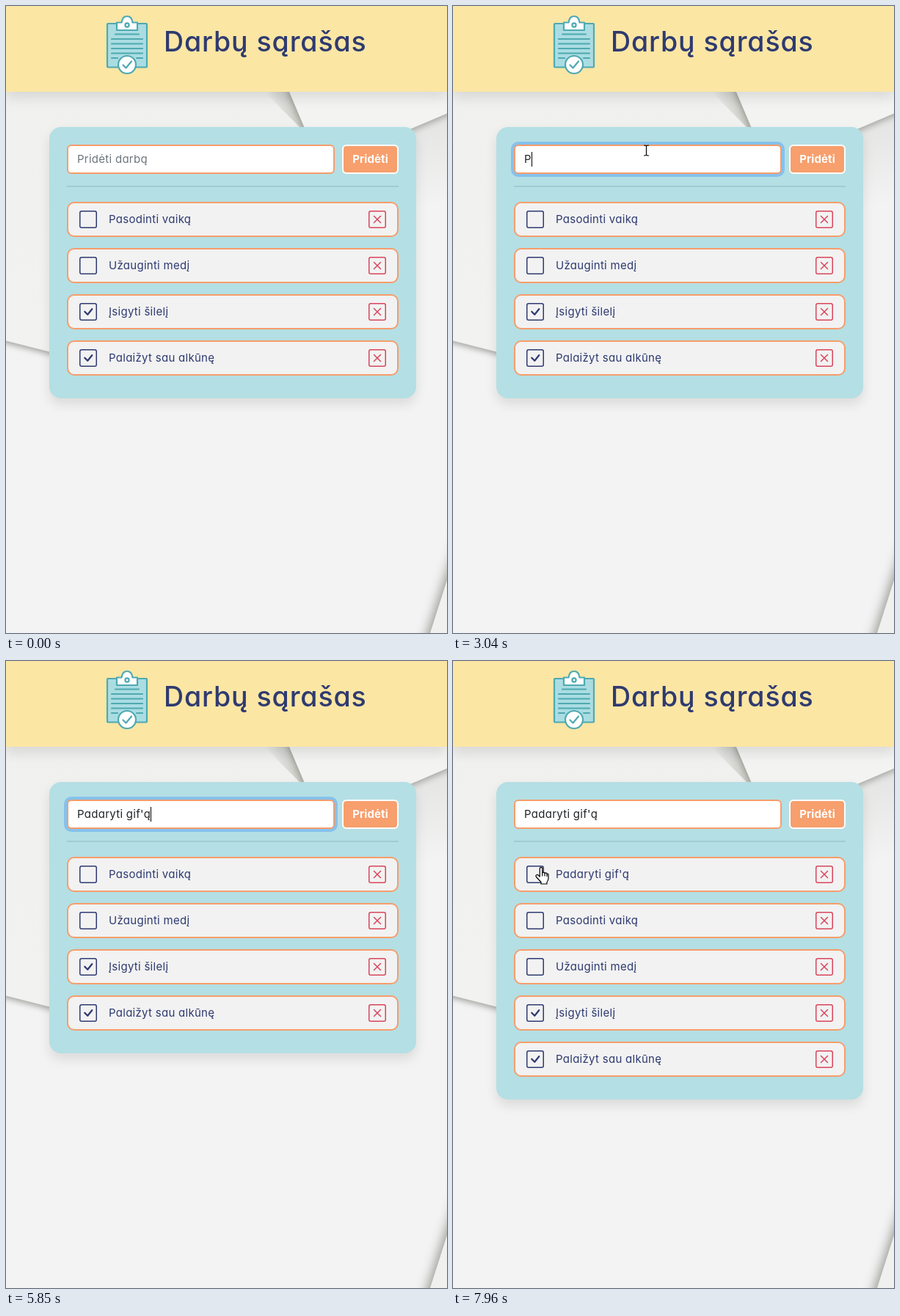
Animation, 601 px wide and 855 px high, one loop 8000 ms. Source, as an HTML page with a canvas:

```html
<!DOCTYPE html>
<html lang="lt">
<head>
<meta charset="utf-8">
<title>Darbų sąrašas</title>
<style>
  html, body { margin: 0; width: 100%; height: 100%; overflow: hidden; }
  body {
    position: relative;
    font: 400 15px/24px Inter, "Open Sans", sans-serif;
    font-feature-settings: "cv11";
    letter-spacing: .28px;
    background: #f3f3f3;
  }
  body * { box-sizing: border-box; }
  #paper, header, #card, #field, #add, hr, li, #pointer { position: absolute; margin: 0; }
  #paper { left: 0; top: 0; }
  header {
    left: 0; top: 0; width: 100%; height: 117px;
    background: #fbe6a4; box-shadow: 0 8px 16px rgba(0, 0, 0, .11);
  }
  header svg { position: absolute; left: 0; top: 0; }
  h1 {
    position: absolute; left: 215px; top: 25px; margin: 0;
    font-size: 37.5px; line-height: 48px; font-weight: 500;
    letter-spacing: .9px; color: #2e3a70; white-space: nowrap;
  }
  #card {
    left: 59px; top: 165px; width: 500px; border-radius: 16px;
    background: #b4dfe4; box-shadow: 0 8px 16px rgba(0, 0, 0, .1);
  }
  #field {
    left: 24px; top: 24px; width: 365px; height: 40px; padding: 0 12px;
    display: flex; align-items: center; white-space: pre;
    background: #fff; border: 2px solid #f79d6b; border-radius: 6px;
  }
  #caret { width: 1px; height: 20px; background: #000; }
  #add {
    left: 399px; top: 24px; width: 77px; height: 40px;
    font-weight: 700; line-height: 36px; letter-spacing: .1px;
    text-align: center; color: #fff;
    background: #f79f6d; border: 2px solid #fff; border-radius: 6px;
  }
  hr { left: 24px; top: 80px; width: 452px; height: 2px; border: 0; background: #a2cbd1; }
  ul { margin: 0; padding: 0; list-style: none; }
  li {
    left: 24px; width: 452px; height: 48px; padding: 0 15px;
    display: flex; align-items: center; color: #2e3a70;
    background: #f2f2f2; border: 2px solid #f79d6b; border-radius: 10px;
  }
  li span { flex: 1; margin-left: 16px; }
  li svg { width: 24px; height: 24px; }
  #pointer { left: 0; top: 0; }
  svg { fill: none; stroke-linecap: round; stroke-linejoin: round; }
</style>
</head>
<body>
<canvas id="paper" width="601" height="855"></canvas>

<header>
  <svg width="210" height="117" stroke="#4fa9b1" stroke-width="2.2">
    <rect x="138" y="24" width="54" height="59.5" rx="1" fill="#aadde2"/>
    <path d="M151 33V22.5h6.5q1-8.5 7.5-8.5t7.5 8.5h6.5V33z" fill="#fff"/>
    <circle cx="165" cy="26" r="2.6" fill="#fff"/>
    <path d="M149 38.5h32M144 45h42M144 51.5h42M144 58h42M144 64.5h42M144 71h8M178 71h8"/>
    <circle cx="165" cy="80" r="12" fill="#fff"/>
    <path d="M159.5 80.5l4 4 7.500-9"/>
  </svg>
  <h1>Darbų sąrašas</h1>
</header>

<main id="card">
  <div id="field"><span id="value"></span><i id="caret"></i></div>
  <div id="add">Pridėti</div>
  <hr>
  <ul id="list"></ul>
</main>

<svg id="pointer" width="601" height="855" stroke="#000">
  <path id="arrow" fill="#fff" d="M.5 .5V16.500l3.700-3.500 2.500 5.800 2.500-1.100-2.500-5.600h5z"/>
  <path id="beam" d="M-3-7q2.500 0 3 1 .5-1 3-1M0-6V6M-3 7q2.500 0 3-1 .5 1 3 1" stroke-width="1.2"/>
  <path id="hand" fill="#fff" stroke-width="1.2"
    d="M-1.700 13V2q0-1.700 1.700-1.700T1.700 2v6.500q.3-1.300 1.700-1.300T5 8.800q.2-1 1.500-1T8 9.500q2-1 2 1V15q0 3-2 5.500V23H0v-2.500L-6.500 13.500q-1.300-2 .3-2.800t3 1zM1.700 8.500V12M5 8.800V12M8 9.500V12.500"/>
</svg>

<script>
const LOOP = 8000, TICK = 70;
const CLICK = 1630, ADDED = 6050, BLUR = 6250;
const $ = id => document.getElementById(id);
const clamp = v => Math.max(0, Math.min(1, v));

function drawPaper() {
  const c = $('paper').getContext('2d');

  function poly(points, fill) {
    c.beginPath();
    points.forEach(([x, y]) => c.lineTo(x, y));
    c.closePath();
    c.fillStyle = fill;
    c.fill();
  }

  function fade(x0, y0, x1, y1, from, to) {
    const g = c.createLinearGradient(x0, y0, x1, y1);
    g.addColorStop(0, from);
    g.addColorStop(1, to);
    return g;
  }

  function sheet(points, fill, dx, dy, blur, alpha) {
    c.save();
    c.shadowColor = `rgba(90, 95, 85, ${alpha})`;
    c.shadowOffsetX = dx;
    c.shadowOffsetY = dy;
    c.shadowBlur = blur;
    poly(points, fill);
    c.restore();
  }

  c.fillStyle = '#f3f3f3';
  c.fillRect(0, 0, 601, 855);
  sheet([[-30, 90], [420, 90], [420, 200], [250, 520], [-30, 449]],
    fade(0, 117, 0, 456, '#f0f0ee', '#f2f2f1'), 0, 3, 8, .55);
  poly([[352, 117], [386, 117], [410, 175], [400, 165]],
    fade(362, 140, 394, 128, 'rgba(150, 152, 142, 0)', 'rgba(150, 152, 142, .5)'));
  poly([[540, 165], [601, 147], [601, 400], [540, 400]],
    fade(570, 160, 595, 270, 'rgba(60, 60, 50, .08)', 'rgba(60, 60, 50, 0)'));
  sheet([[386, 117], [386, 90], [640, 90], [640, 130], [553, 167], [430, 220]],
    '#f3f3f2', 0, 3, 10, .5);
  sheet([[640, 665], [601, 783], [578, 855], [570, 880], [640, 880]],
    '#f0f0ef', -3, 0, 16, .65);
}

function icon(color, mark, width) {
  return `<svg viewBox="0 0 16 16" stroke="${color}">
    <rect x=".5" y=".5" width="15" height="15" rx="1.5"/>
    <path d="${mark}" stroke-width="${width}"/></svg>`;
}

const tasks = [
  ["Padaryti gif'ą"], ['Pasodinti vaiką'], ['Užauginti medį'],
  ['Įsigyti šilelį', true], ['Palaižyt sau alkūnę', true]
];
const rows = tasks.map(([text, done]) => {
  const row = document.createElement('li');
  row.innerHTML = icon('#2e3a70', done ? 'M4.850 7.850l2.650 2.650 4-5' : '', 1.5) +
    `<span>${text}</span>` + icon('#d9455a', 'M5 5l6 6M11 5l-6 6', 1);
  $('list').append(row);
  return row;
});

// Evenly typed runs of letters
const bursts = [
  { start: 2970, gap: 200, count: 5 },
  { start: 4100, gap: 113, count: 4 },
  { start: 5030, gap: 155, count: 5 }
];
const keys = bursts.flatMap(b =>
  Array.from({ length: b.count }, (_, i) => b.start + i * b.gap));

// Curved moves; the pointer rests on `to` until `gone`
const moves = [
  { start: 110, stop: 590, gone: 790, from: [500, 735], bend: [335, 465], to: [257, 313] },
  { start: 790, stop: 1560, gone: 3630, from: [256, 308], bend: [206, 207], to: [263.5, 197] },
  { start: 7060, stop: 7890, gone: LOOP, from: [262, 198], bend: [205, 222], to: [120, 281] }
];

function place({ start, stop, from, bend, to }, t) {
  const p = clamp(Math.floor((t - start) / TICK + 1e-6) * TICK / (stop - start));
  const q = 1 - p;
  return from.map((v, i) => q * q * v + 2 * p * q * bend[i] + p * p * to[i]);
}

function drawPointer(t) {
  const move = moves.find(m => t >= m.start && t < m.gone);
  let kind = '';
  if (move) {
    const [x, y] = place(move, t);
    kind = y < 229 ? 'beam' : x < 125 ? 'hand' : 'arrow';
    $(kind).setAttribute('transform', `translate(${x} ${y})`);
  }
  for (const id of ['arrow', 'beam', 'hand']) {
    $(id).style.display = id === kind ? '' : 'none';
  }
}

function drawField(t) {
  const past = keys.filter(k => t >= k);
  const typed = tasks[0][0].slice(0, past.length);
  $('value').textContent = typed || 'Pridėti darbą';
  $('value').style.color = typed ? '#212529' : '#6c757d';

  const idle = t - (past.pop() || CLICK);
  const lit = t >= CLICK && t < ADDED && idle % 1010 < 480;
  const caret = $('caret').style;
  caret.visibility = lit ? 'visible' : 'hidden';
  caret.order = typed ? 0 : -1;
  caret.marginRight = typed ? '0' : '-1px';

  const focus = t < BLUR ? clamp((t - CLICK + 50) / 180) : 0;
  $('field').style.boxShadow = `0 0 0 ${4 * focus}px rgba(13, 110, 253, ${.27 * focus})`;
}

function drawList(t) {
  const hidden = t < ADDED ? 1 : 0;
  rows.forEach((row, i) => {
    row.style.display = i < hidden ? 'none' : '';
    row.style.top = 102 + 63 * (i - hidden) + 'px';
  });
  $('card').style.height = 118 + 63 * (rows.length - hidden) + 'px';
}

const begin = performance.now();
function frame() {
  const t = (performance.now() - begin) % LOOP;
  drawField(t);
  drawList(t);
  drawPointer(t);
  requestAnimationFrame(frame);
}

drawPaper();
frame();
</script>
</body>
</html>
```
